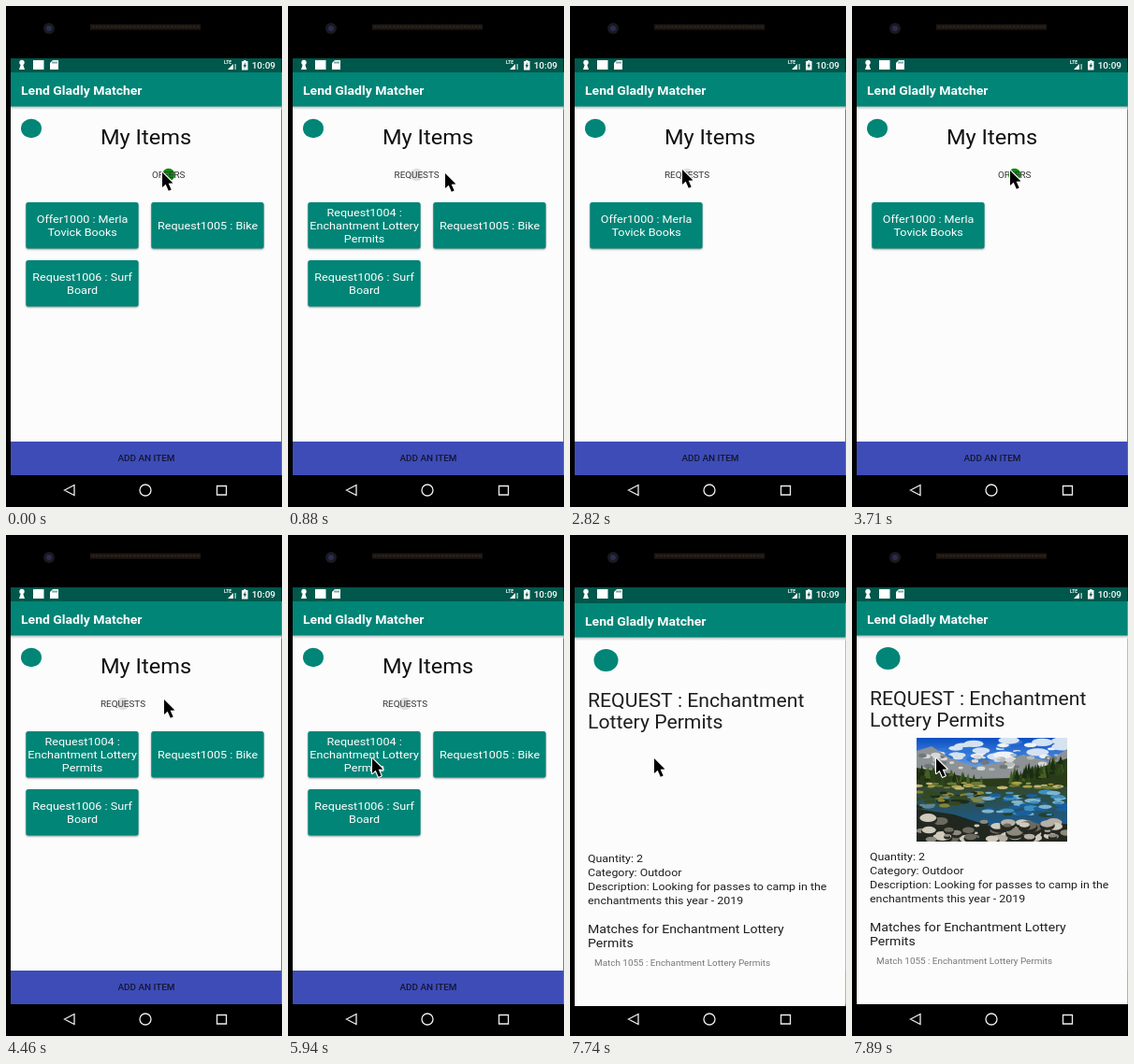
Recreate the animation shown at these times as an HTML page with a canvas. Size 295 by 536 pixels, loop 8000 ms.

```html
<!DOCTYPE html>
<html lang="en">
<head>
<meta charset="utf-8">
<title>Item matcher</title>
<style>
  html, body { margin: 0; width: 100%; height: 100%; overflow: hidden; background: #000; }
  canvas { display: block; width: 295px; height: 536px; }
</style>
</head>
<body>
<canvas id="stage"></canvas>
<script>
const W = 295, H = 536, LOOP = 8000, STEP = 146;
const ASPECT = 1.08; // the phone screen is shown slightly wide
const TEAL = '#008577', DARK_TEAL = '#00574b', PAPER = '#fcfcfc', INK = '#1e1e1e';
const APP_NAME = 'Lend Gladly Matcher';
const scale = window.devicePixelRatio || 1;

const view = prepare(document.getElementById('stage'));
const layer = document.createElement('canvas');
const detailView = prepare(layer);

const OFFER = 'Offer1000 : Merla\nTovick Books';
const REQUESTS = ['Request1004 :\nEnchantment Lottery\nPermits', 'Request1005 : Bike', 'Request1006 : Surf\nBoard'];

const CURSOR_HOME = { x: 167, y: 178 };
const MOVES = [
  { at: 290, steps: 1, x: 168, y: 179 },
  { at: 1480, steps: 5, x: 110, y: 176 },
  { at: 2370, steps: 2, x: 120, y: 175 },
  { at: 3410, steps: 3, x: 169, y: 176 },
  { at: 5050, steps: 5, x: 74, y: 248 },
  { at: 5790, steps: 2, x: 90, y: 239 }
];
const FLIPS = [
  { at: 580, steps: 3, on: 0 },
  { at: 2820, steps: 2, on: 1 },
  { at: 4160, steps: 2, on: 0 }
];
const OPEN_AT = 7590;

const easeOut = p => 1 - (1 - p) ** 2;
const smooth = p => p * p * (3 - 2 * p);
const mix = (a, b, p) => a + (b - a) * p;
const stepsSince = (t, at) => Math.floor((t - at) / STEP);

function cursorAt(t) {
  let { x, y } = CURSOR_HOME;
  for (const move of MOVES) {
    if (t < move.at) break;
    const p = easeOut(Math.min(1, (stepsSince(t, move.at) + 1) / move.steps));
    x = mix(x, move.x, p);
    y = mix(y, move.y, p);
  }
  return { x, y };
}

function switchAt(t) {
  let pos = 1, items = [OFFER, ...REQUESTS.slice(1)];
  for (const flip of FLIPS) {
    if (t < flip.at) break;
    pos = mix(pos, flip.on, smooth(Math.min(1, stepsSince(t, flip.at) / flip.steps)));
    items = flip.on ? [OFFER] : REQUESTS;
  }
  return { pos, items };
}

function prepare(canvas) {
  canvas.width = Math.round(W * scale);
  canvas.height = Math.round(H * scale);
  const c = canvas.getContext('2d');
  c.scale(scale, scale);
  return c;
}

function rect(c, color, x, y, w, h) {
  c.fillStyle = color;
  c.fillRect(x, y, w, h);
}

function oval(c, color, x, y, rx, ry = rx) {
  c.fillStyle = color;
  c.beginPath();
  c.ellipse(x, y, rx, ry, 0, 0, Math.PI * 2);
  c.fill();
}

function poly(c, color, ...points) {
  c.fillStyle = color;
  c.beginPath();
  for (let i = 0; i < points.length; i += 2) c.lineTo(points[i], points[i + 1]);
  c.closePath();
  c.fill();
}

function fade(c, y, h, from, to) {
  const gradient = c.createLinearGradient(0, y, 0, y + h);
  gradient.addColorStop(0, from);
  gradient.addColorStop(1, to);
  return gradient;
}

// y is the middle of the capital letters.
function text(c, str, x, y, size, color, align = 'left', weight = 400) {
  const height = size / ASPECT;
  c.save();
  c.translate(x, y + height * .355);
  c.scale(ASPECT, 1);
  c.font = `${weight} ${height}px Roboto, sans-serif`;
  c.textAlign = align;
  c.fillStyle = color;
  c.fillText(str, 0, 0);
  c.restore();
}

function lines(c, str, x, y, gap, size, color, align) {
  str.split('\n').forEach((line, i) => text(c, line, x, y + i * gap, size, color, align));
}

function appFrame(c) {
  rect(c, DARK_TEAL, 5, 56, 289.5, 15);
  rect(c, PAPER, 5, 71, 289.5, 431);
  rect(c, fade(c, 107, 4, '#b4b8b8', PAPER), 5, 107, 289.5, 4);
  rect(c, TEAL, 5, 71, 289.5, 36.5);
  text(c, APP_NAME, 16, 90, 14, '#fff', 'left', 700);
}

function card(c, label, index) {
  const x = 21.3 + (index % 2) * 134, y = 210 + Math.floor(index / 2) * 62;
  const extra = label.split('\n').length - 1;
  c.save();
  c.shadowColor = 'rgba(0,0,0,.4)';
  c.shadowBlur = 2 * scale;
  c.shadowOffsetY = scale;
  c.fillStyle = TEAL;
  c.beginPath();
  c.roundRect(x, y, 120.3, 49.5, 2.5);
  c.fill();
  c.restore();
  lines(c, label, x + 60.3, y + 25 - extra * 7, 14, 12.6, '#fff', 'center');
}

function toggle(c, pos) {
  const on = pos > .5, x = mix(125, 173.7, pos);
  oval(c, on ? '#108a14' : '#e0e0e0', x, 180.5, 6.8);
  text(c, on ? 'OFFERS' : 'REQUESTS', x, 181, 9.9, '#333', 'center');
}

function listScreen(c, items, pos) {
  appFrame(c);
  oval(c, TEAL, 27, 131, 11, 11 / ASPECT);
  text(c, 'My Items', 149.5, 140.5, 23.6, '#111', 'center');
  toggle(c, pos);
  items.forEach((label, i) => card(c, label, i));
  rect(c, '#3e4cb8', 5, 466, 289.5, 36);
  text(c, 'ADD AN ITEM', 150, 484, 9.9, '#15172f', 'center', 500);
}

function seeded(seed) {
  return () => (seed = (seed * 16807) % 2147483647) / 2147483647;
}

function photo(c) {
  const random = seeded(71);
  const pick = colors => colors[Math.floor(random() * colors.length)];
  const scatter = (count, x, y, w, h, size, flat, ...colors) => {
    for (let i = 0; i < count; i++) {
      const r = size * (.5 + random());
      oval(c, pick(colors), x + random() * w, y + random() * h, r, r * flat);
    }
  };
  const trees = (count, x, w, ridge) => {
    for (let i = 0; i < count; i++) {
      const tx = x + random() * w, ty = ridge(tx) + random() * 12, h = 7 + random() * 9;
      poly(c, pick(['#1c2c12', '#2b4419', '#466024']), tx, ty, tx + 3, ty + h, tx - 3, ty + h);
    }
  };
  c.save();
  c.translate(69, 217);
  c.beginPath();
  c.rect(0, 0, 161, 111);
  c.clip();
  rect(c, fade(c, 0, 36, '#0a4fc4', '#6fa9ea'), 0, 0, 161, 60);
  scatter(34, 10, 2, 150, 22, 8, .35, '#eef3f8', '#d5e2f0', '#2d74d6');
  poly(c, '#8d9295', 0, 14, 16, 9, 36, 22, 62, 31, 92, 26, 114, 18, 140, 25, 161, 12, 161, 56, 0, 56);
  scatter(45, 0, 18, 150, 16, 3.5, .5, '#d8d9d7', '#b6babb', '#70777a');
  poly(c, '#2a3b1a', 0, 32, 30, 37, 62, 44, 100, 43, 161, 22, 161, 58, 0, 58);
  trees(35, 0, 70, x => 27 + x * .18);
  trees(45, 95, 66, x => 60 - x * .28);
  rect(c, fade(c, 52, 40, '#33482a', '#1c5a8c'), 0, 52, 161, 59);
  scatter(40, 0, 48, 161, 6, 4, .3, '#a9a04a', '#6d7a33', '#c2b778');
  scatter(50, 0, 58, 80, 16, 5, .35, '#8a8434', '#33481f', '#1d2c1a', '#5d8594');
  scatter(45, 75, 58, 86, 26, 6, .3, '#3d8fc0', '#1a5f9c', '#27402a', '#7eb4cf');
  poly(c, '#20271f', 0, 76, 40, 82, 80, 95, 161, 92, 161, 111, 0, 111);
  for (let i = 0; i < 52; i++) {
    const x = random() * 161, y = mix(79 + Math.min(x, 80) * .14, 109, random()), r = 3 + random() * 8;
    oval(c, '#262922', x, y + 2, r, r * .6);
    oval(c, pick(['#b5b0a5', '#8d897d', '#d0cabd', '#6c6a60']), x, y, r * .9, r * .45);
  }
  c.restore();
}

function detailScreen(c, hasPhoto) {
  c.clearRect(0, 0, W, H);
  appFrame(c);
  rect(c, '#000', 5, 502, 290, 31);
  oval(c, TEAL, 38.5, 132, 13, 13 / ASPECT);
  lines(c, 'REQUEST : Enchantment\nLottery Permits', 19, 175, 23, 21.2, INK);
  if (hasPhoto) photo(c);
  lines(c, 'Quantity: 2\nCategory: Outdoor\nDescription: Looking for passes to camp in the\n' +
    'enchantments this year - 2019', 19, 343.5, 15.3, 12.4, INK);
  lines(c, 'Matches for Enchantment Lottery\nPermits', 19, 419, 15.5, 14.1, INK);
  text(c, 'Match 1055 : Enchantment Lottery Permits', 26, 456, 9.9, '#777');
}

function phoneBody(c) {
  rect(c, '#000', 0, 0, W, H);
  oval(c, '#191a20', 46, 24, 6);
  oval(c, '#2b2d4c', 46, 24, 3);
  rect(c, '#1d1713', 90, 19.5, 118, 6);
  for (let x = 92; x < 206; x += 4) rect(c, '#30271f', x, 21.5, 2.5, 1.5);
}

function statusIcons(c) {
  oval(c, '#fff', 17, 60.5, 2.7);
  poly(c, '#fff', 16, 62, 18, 62, 20, 68, 14, 68);
  rect(c, '#fff', 29, 58, 11.5, 10);
  poly(c, '#fff', 47, 61, 50, 58, 56, 58, 56, 68, 47, 68);
  for (let x = 49.6; x < 55; x += 2) rect(c, DARK_TEAL, x, 59.5, 1, 2);
  text(c, 'LTE', 233, 60, 5, '#fff', 'left', 700);
  poly(c, '#fff', 237, 68, 243, 62, 243, 68);
  rect(c, '#cfe0dd', 244.5, 62, 1.2, 6);
  rect(c, '#fff', 252, 59, 6.5, 9.5);
  rect(c, '#fff', 254, 58, 2.5, 1);
  poly(c, DARK_TEAL, 256, 60, 253.5, 64.5, 255, 64.5, 254.5, 67.5, 257, 63, 255.5, 63);
  text(c, '10:09', 288, 63.5, 10, '#fff', 'right', 500);
}

function navIcons(c) {
  c.strokeStyle = '#eee';
  c.lineWidth = 1.3;
  c.beginPath();
  c.moveTo(62.5, 518);
  c.lineTo(73, 512.5);
  c.lineTo(73, 523.5);
  c.closePath();
  c.moveTo(155, 518);
  c.arc(149, 518, 6, 0, Math.PI * 2);
  c.rect(225.5, 513.5, 10, 9.5);
  c.stroke();
}

function cursor(c, { x, y }) {
  c.save();
  c.translate(x, y);
  c.lineJoin = 'round';
  c.strokeStyle = '#fff';
  c.lineWidth = 2.2;
  poly(c, '#000', 0, 0, 0, 16, 3.7, 12.7, 6.8, 19.8, 9.7, 18.5, 6.6, 11.7, 11.5, 11.4);
  c.stroke();
  c.fill();
  c.restore();
}

function openDetail(c, step) {
  detailScreen(detailView, step > 1);
  c.save();
  c.beginPath();
  c.rect(5, 56, 290, 477);
  c.clip();
  c.globalAlpha = Math.min(1, .28 + .72 * step);
  c.drawImage(layer, 0, Math.round(30 * .07 ** step), W, H);
  c.restore();
}

function draw(t) {
  const { pos, items } = switchAt(t);
  phoneBody(view);
  listScreen(view, items, pos);
  if (t >= OPEN_AT) openDetail(view, stepsSince(t, OPEN_AT));
  statusIcons(view);
  navIcons(view);
  cursor(view, cursorAt(t));
}

const start = performance.now();
function tick() {
  draw((performance.now() - start) % LOOP);
  requestAnimationFrame(tick);
}
tick();
</script>
</body>
</html>
```
